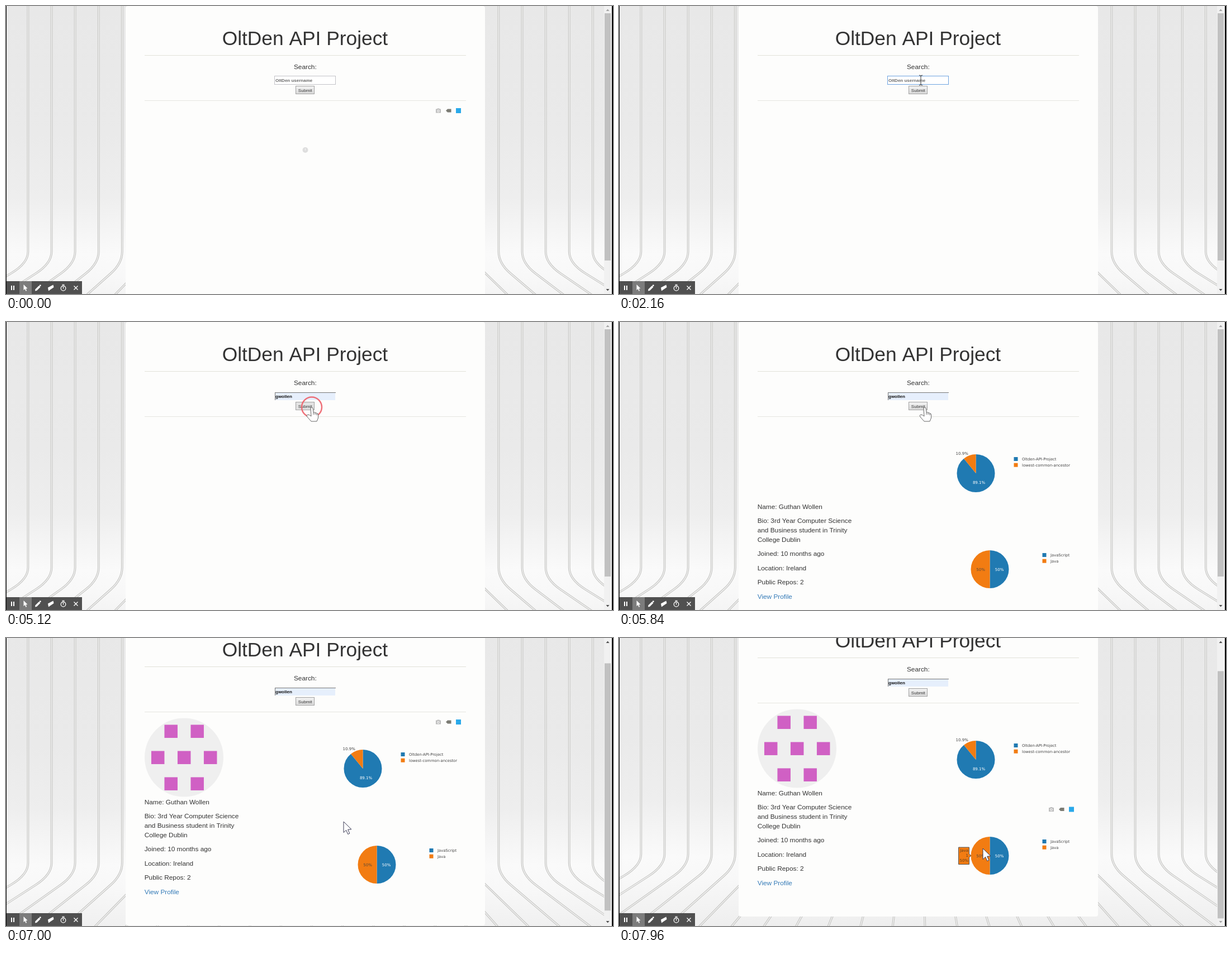
Animation, 1086 px wide and 516 px high, one loop 8 s. Source, as an HTML page with a canvas:

```html
<!DOCTYPE html>
<html lang="en">
<head>
<meta charset="utf-8">
<title>API project demo</title>
<style>
html, body { margin: 0; width: 100%; height: 100%; overflow: hidden; background: #fff; }
canvas { display: block; }
</style>
</head>
<body>
<canvas id="stage" width="1086" height="516"></canvas>
<script>
const ctx = document.getElementById('stage').getContext('2d');
const LOOP = 8000, STEP = 40;
const SANS = '"Liberation Sans", Arial, sans-serif';
const CHART = '"DejaVu Sans", Verdana, sans-serif';
const BLUE = '#207ab2', ORANGE = '#f27c12';
const BRAND = 'OltDen', USER = 'gwollen';

// Keyframes: [time, value...], eased between neighbours.
const CURSOR = [[440, 720, 300], [1080, 568, 112], [1240, 564, 122], [1520, 540, 133],
  [4880, 540, 133], [5040, 547, 153], [6560, 547, 153], [7000, 604, 329],
  [7160, 604, 329], [7960, 651, 377]];
const SCROLL = [[6880, 0], [7000, 37], [7040, 53]];
const TYPING = [[2600, 1], [2920, 2], [3000, 3], [3400, 4], [3920, 7]];

function track(keys, t) {
  if (t <= keys[0][0]) return keys[0].slice(1);
  for (let i = 1; i < keys.length; i++) {
    const a = keys[i - 1], b = keys[i];
    if (t <= b[0]) {
      const p = (t - a[0]) / (b[0] - a[0]), e = p * p * (3 - 2 * p);
      return a.slice(1).map((v, n) => v + (b[n + 1] - v) * e);
    }
  }
  return keys[keys.length - 1].slice(1);
}

function rect(x, y, w, h, color) {
  ctx.fillStyle = color;
  ctx.fillRect(x, y, w, h);
}

function frame(x, y, w, h, color) {
  ctx.strokeStyle = color;
  ctx.lineWidth = 1;
  ctx.strokeRect(x + .5, y + .5, w - 1, h - 1);
}

function text(str, x, y, font, color = '#333', align = 'left') {
  ctx.font = font;
  ctx.fillStyle = color;
  ctx.textAlign = align;
  ctx.fillText(str, x, y);
}

function disc(x, y, r, color) {
  ctx.fillStyle = color;
  ctx.beginPath();
  ctx.arc(x, y, r, 0, 7);
  ctx.fill();
}

function shape(points, fill, stroke, width = 1) {
  ctx.beginPath();
  points.forEach(([x, y]) => ctx.lineTo(x, y));
  ctx.closePath();
  if (fill) { ctx.fillStyle = fill; ctx.fill(); }
  if (stroke) { ctx.strokeStyle = stroke; ctx.lineWidth = width; ctx.stroke(); }
}

function vertical(y0, y1, ...stops) {
  const g = ctx.createLinearGradient(0, y0, 0, y1);
  stops.forEach(([at, color]) => g.addColorStop(at, color));
  return g;
}

function backdrop() {
  rect(0, 0, 1086, 570, vertical(0, 570, [0, '#e8e8e8'], [.4, '#eaeaea'],
    [.6, '#eeeeee'], [.78, '#fafafa'], [.85, '#f8f8f8'], [1, '#eeeeee']));
  // Grooves run down the wall, bend, then fan out over the floor.
  for (let i = -10; i < 36; i++) {
    const x = 39.4 + i * 42.1, slope = (x - 537) * .0034;
    const groove = () => {
      ctx.beginPath();
      ctx.moveTo(x, -5);
      ctx.lineTo(x, 440);
      ctx.quadraticCurveTo(x, 461, x + slope * 18, 479);
      ctx.lineTo(x + slope * 121, 582);
      ctx.stroke();
    };
    ctx.lineWidth = 3.7;
    ctx.strokeStyle = '#c1c1be';
    groove();
    ctx.lineWidth = 1.7;
    ctx.strokeStyle = '#f1f1f1';
    groove();
  }
  ctx.fillStyle = '#fdfdfc';
  ctx.beginPath();
  ctx.roundRect(214, 0, 643, 552, 4);
  ctx.fill();
}

function searchForm(t) {
  text(BRAND + ' API Project', 386.7, 70, '35.35px ' + SANS);
  rect(248, 88, 575, 1, '#e2e2d9');
  text('Search:', 535.3, 112.5, '11.84px ' + SANS, '#333', 'center');
  rect(248, 169, 575, 1, '#e6e6e0');

  const typed = TYPING.filter(k => t >= k[0]).pop();
  const value = USER.slice(0, typed ? typed[1] : 0);
  const focused = t >= 1600 && t < 5080, filled = t >= 3920;
  rect(481, 126, 108, 14, filled ? '#e6effc' : '#fff');
  if (focused) frame(480, 125, 110, 16, '#6ea3e0');
  else if (filled) {
    rect(481, 126, 109, 1, '#777');
    rect(481, 126, 1, 14, '#777');
  } else frame(480, 125, 110, 16, '#c3c3c8');
  const bold = 'bold 8px ' + SANS;
  text(value || BRAND + ' username', 482, 136, bold, value ? '#111' : '#6c6c6c');
  const blinkOff = t >= 2160 && t < 2600;
  if (focused && !blinkOff) {
    ctx.font = bold;
    rect(Math.round(482 + ctx.measureText(value).width), 129, 1, 8, '#111');
  }

  const pressed = t >= 5080 && t < 5240;
  rect(518, 143, 34, 15, pressed ? '#e2e2e2' : vertical(143, 158, [0, '#f4f4f4'], [1, '#d9d9d9']));
  frame(518, 143, 34, 15, '#a2a2a2');
  text('Submit', 535.3, 153.5, '8px ' + SANS, '#333', 'center');
}

function modebar(y) {
  rect(769, y - 3, 9, 7, '#bdbdbd');
  rect(771.5, y - 4, 4, 2, '#bdbdbd');
  disc(773.5, y + .5, 2.3, '#fdfdfd');
  disc(773.5, y + .5, 1.3, '#bdbdbd');
  shape([[787, y], [790, y - 3], [796.5, y - 3], [796.5, y + 3], [790, y + 3]], '#7b7b73');
  rect(805, y - 4.5, 9, 9, '#2aa9ea');
}

function slice(x, y, from, to, color) {
  ctx.fillStyle = color;
  ctx.beginPath();
  ctx.moveTo(x, y);
  ctx.arc(x, y, 34, (from - .25) * 2 * Math.PI, (to - .25) * 2 * Math.PI);
  ctx.fill();
}

function legend(x, y, labels) {
  labels.forEach((label, i) => {
    const row = y + i * 10.7;
    rect(x, row - 3.5, 7, 7, i ? ORANGE : BLUE);
    text(label, x + 14.5, row + 2.5, '6.8px ' + CHART, '#444');
  });
}

function charts() {
  const font = '7px ' + CHART;
  slice(638.5, 271, 0, .891, BLUE);
  slice(638.5, 271, .891, 1, ORANGE);
  text('89.1%', 644, 289.7, font, '#fff', 'center');
  text('10.9%', 613.7, 238.3, font, '#444', 'center');
  legend(706.5, 245.5, ['Oltden-API-Project', 'lowest-common-ancestor']);
  slice(663.5, 443, 0, .5, BLUE);
  slice(663.5, 443, .5, 1, ORANGE);
  text('50%', 680.5, 445.7, font, '#fff', 'center');
  text('50%', 647, 445.7, font, '#5a4a3a', 'center');
  legend(757.5, 417.5, ['JavaScript', 'Java']);
}

function profile(t) {
  const lines = [['Name: Guthan Wollen', 334.5], ['Bio: 3rd Year Computer Science', 360],
    ['and Business student in Trinity', 377], ['College Dublin', 393.7],
    ['Joined: 10 months ago', 419], ['Location: Ireland', 444.5],
    ['Public Repos: 2', 470], ['View Profile', 496]];
  lines.forEach(([line, y]) =>
    text(line, 247.7, y, '11.84px ' + SANS, line === 'View Profile' ? '#337ab7' : '#333'));
  if (t < 5920) return;
  disc(318.5, 251, 70.5, '#efefef');
  const cell = 23.5;
  for (const [col, row] of [[-1, -2], [1, -2], [-2, 0], [0, 0], [2, 0], [-1, 2], [1, 2]])
    rect(318.7 + (col - .5) * cell, 251.2 + (row - .5) * cell, cell, cell, '#d060c4');
}

function hoverLabel() {
  shape([[607.5, 428], [626.5, 428], [626.5, 440], [630, 443], [626.5, 446],
    [626.5, 458.5], [607.5, 458.5]], ORANGE, '#555');
  ['Java', '1', '50%'].forEach((line, i) =>
    text(line, 625, 436 + i * 9.2, '7px ' + CHART, '#604020', 'right'));
}

function pointer(kind, x, y) {
  ctx.save();
  ctx.translate(x, y);
  ctx.lineJoin = 'round';
  if (kind === 'text') {
    ctx.strokeStyle = '#333';
    ctx.lineWidth = 1;
    ctx.beginPath();
    for (const s of [-1, 1]) {
      ctx.moveTo(-3, s * 9);
      ctx.quadraticCurveTo(0, s * 9, 0, s * 7);
      ctx.lineTo(0, 0);
      ctx.moveTo(3, s * 9);
      ctx.quadraticCurveTo(0, s * 9, 0, s * 7);
    }
    ctx.stroke();
  } else if (kind === 'hand') {
    const outline = new Path2D('M-2 1Q0-1 2 1L3 9Q5 7 6 10Q8 8 9 11Q11 10 11.5 13V19L9 25H-1L-8 17Q-10 14-7.5 13Q-5 12-1 16Z');
    ctx.fillStyle = '#fff';
    ctx.fill(outline);
    ctx.strokeStyle = '#666';
    ctx.lineWidth = 1;
    ctx.stroke(outline);
    ctx.stroke(new Path2D('M3 9V13M6 10V13M9 11V14'));
  } else {
    shape([[0, 0], [0, 19.5], [4.6, 15.2], [7.7, 22.5], [10.8, 21.2], [7.7, 14.2], [14, 13.8]],
      '#fff', '#3b3b55');
  }
  ctx.restore();
}

function clickRing(t, start, x, y) {
  const age = t - start;
  if (age < 0 || age > 280) return;
  ctx.globalAlpha = age < 160 ? .9 : .9 * (1 - (age - 160) / 160);
  ctx.strokeStyle = '#ee626b';
  ctx.lineWidth = 2.5;
  ctx.beginPath();
  ctx.arc(x, y, Math.min(18, 14 + age / 10), 0, 7);
  ctx.stroke();
  ctx.globalAlpha = 1;
}

function scrollbar(scroll) {
  rect(1070, 0, 14, 516, '#f1f1f1');
  rect(1071, 13 + scroll * .875, 11, 443, '#c1c1c1');
  shape([[1073.5, 9], [1079.5, 9], [1076.5, 5.5]], scroll ? '#505050' : '#a3a3a3');
  shape([[1073.5, 507], [1079.5, 507], [1076.5, 510.5]], scroll > 52 ? '#a3a3a3' : '#505050');
}

function recorderBar() {
  rect(1, 493, 135, 23, '#505050');
  rect(24, 493, 22, 23, '#7c7c7c');
  rect(9, 501, 2, 8, '#fff');
  rect(13, 501, 2, 8, '#fff');
  shape([[31.5, 499], [31.5, 509], [34, 507], [35.5, 511], [37, 510], [35.5, 506.5], [38.5, 506]], '#fff');
  shape([[52, 510.5], [52.5, 507.5], [59, 501], [61.5, 503.5], [55, 510]], '#fff');
  rect(60, 499.5, 2.5, 2.5, '#fff');
  shape([[75, 504.5], [84.5, 499.5], [85.5, 504], [76, 510.5]], '#fff');
  ctx.strokeStyle = '#fff';
  ctx.lineWidth = 1.3;
  ctx.beginPath();
  ctx.arc(102.5, 505.8, 4.3, 0, 7);
  ctx.moveTo(102.5, 503);
  ctx.lineTo(102.5, 506.5);
  ctx.moveTo(100.5, 499.5);
  ctx.lineTo(104.5, 499.5);
  ctx.moveTo(121.5, 501.5);
  ctx.lineTo(128.5, 508.5);
  ctx.moveTo(128.5, 501.5);
  ctx.lineTo(121.5, 508.5);
  ctx.stroke();
}

function draw(t) {
  const [scroll] = track(SCROLL, t), [x, y] = track(CURSOR, t);
  const pageY = y + scroll, loaded = t >= 5840;
  const inPie = Math.hypot(x - 663.5, pageY - 443) < 34 && x < 663.5;

  ctx.clearRect(0, 0, 1086, 516);
  ctx.save();
  ctx.translate(0, -scroll);
  backdrop();
  searchForm(t);
  if (loaded) {
    profile(t);
    charts();
  }
  if (t < 640) modebar(187.5);
  else if (t > 6600 && x > 560) modebar(pageY < 372 ? 187.5 : 360);
  if (loaded && inPie) hoverLabel();
  ctx.restore();

  if (t < 40) {
    disc(535.5, 258, 5, '#dedede');
    rect(535, 255, 1, 4, '#f6f6f6');
  }
  clickRing(t, 1600, 540, 133);
  clickRing(t, 5080, 547, 152.5);
  const visible = t >= 440 && (t < 2600 || t >= 4880);
  if (visible) {
    const overInput = x > 481 && x < 590 && pageY > 125 && pageY < 141;
    const overButton = x > 518 && x < 553 && pageY >= 143 && pageY < 158;
    pointer(overInput ? 'text' : overButton ? 'hand' : 'arrow', x, y);
  }

  scrollbar(scroll);
  recorderBar();
  rect(0, 0, 1, 516, '#000');
  rect(1084, 0, 2, 516, '#000');
}

function tick(now) {
  draw(Math.floor((now % LOOP) / STEP) * STEP);
  requestAnimationFrame(tick);
}
requestAnimationFrame(tick);
</script>
</body>
</html>
```
